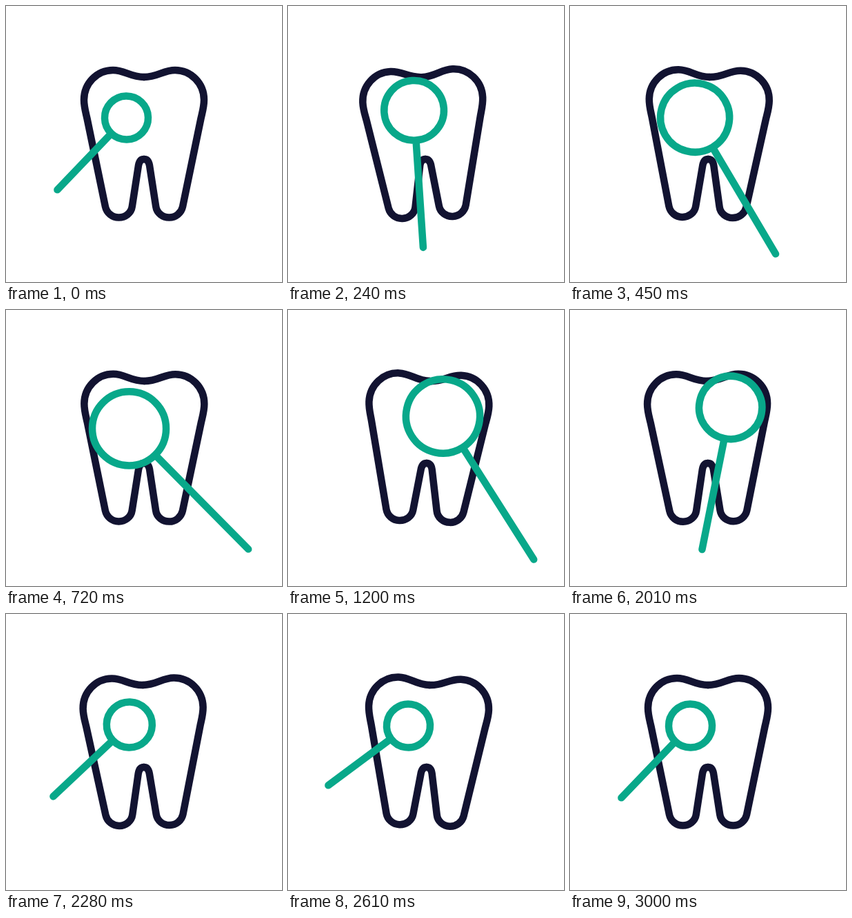
An HTML page with a canvas that plays this animation: 400 px wide and 400 px high, repeating every 5.03 s.

```html
<!DOCTYPE html>
<html lang="en">
<head>
<meta charset="utf-8">
<title>Dental check</title>
<style>
  html, body { margin: 0; width: 100%; height: 100%; overflow: hidden; background: #fff; }
  canvas { display: block; width: 100vmin; height: 100vmin; margin: 0 auto; }
</style>
</head>
<body>
<canvas id="stage"></canvas>
<script>
const canvas = document.getElementById('stage');
const ctx = canvas.getContext('2d');
const SIZE = 400, LOOP = 5030, MOVE_END = 3000;
const NAVY = '#121331', TEAL = '#08a88a';

// Right half of the tooth, measured from its vertical axis.
const halfTooth = new Path2D(
  'M0 103C20 103 28 93 45 93C68 93 87 112 87 136C87 146 84.5 154 82.5 163' +
  'L56 291C54 300 46 306.5 36.5 306.5C27 306.5 18.5 300 17.2 290.5' +
  'L8 231C7 225.5 4.5 222 0 222');

// Tooth rocking: [time, degrees]
const rocking = [
  [0, 0], [255, -2.4], [570, 2.4], [885, -2.4], [1200, 2.2], [1515, -2.4],
  [1830, 2.4], [2150, -2.4], [2470, 2.4], [MOVE_END, 0]
];

const mix = (a, b, p) => a + (b - a) * p;
const span = (t, from, to) => Math.min(1, Math.max(0, (t - from) / (to - from)));
const ease = (t, from, to) => (1 - Math.cos(Math.PI * span(t, from, to))) / 2;

function keyed(keys, t) {
  const i = keys.findIndex(k => t <= k[0]);
  if (i < 0) return keys[keys.length - 1][1];
  if (i === 0) return keys[0][1];
  const [from, a] = keys[i - 1], [to, b] = keys[i];
  return mix(a, b, ease(t, from, to));
}

function lensPose(t) {
  if (t < 800) {
    // Swing in and grow.
    const p = 1 - (1 - span(t, 0, 750)) ** 2;
    return {
      x: 174.5 + 4 * p + 24 * p * (1 - p),
      y: 162 + 64.5 * p * (p - 0.845),
      angle: mix(133.8, 45.2, p),
      scale: mix(1, 1.7, p)
    };
  }
  if (t < 1600) {
    // Glide across the crown.
    const p = ease(t, 800, 1600);
    return {
      x: mix(178.5, 270.5, p),
      y: mix(172, 128, p) + 4 * Math.sin(Math.PI * p),
      angle: mix(45.2, 70, p),
      scale: 1.7
    };
  }
  // Return, overshoot and settle.
  const p = ease(t, 1740, 2365);
  return {
    x: mix(270.5, 174.5, p),
    y: mix(128, 162, p),
    angle: mix(70, 147, ease(t, 1640, 2480)) - 13.2 * ease(t, 2480, 2850),
    scale: mix(1.7, 1, ease(t, 1750, 2388))
  };
}

function drawTooth(t) {
  ctx.save();
  ctx.strokeStyle = NAVY;
  ctx.translate(200, 250);
  ctx.rotate(keyed(rocking, t) * Math.PI / 180);
  ctx.translate(0, -250);
  ctx.stroke(halfTooth);
  ctx.scale(-1, 1);
  ctx.stroke(halfTooth);
  ctx.restore();
}

function drawLens(t) {
  const { x, y, angle, scale } = lensPose(t);
  const radius = 31.5 * scale;
  ctx.save();
  ctx.strokeStyle = TEAL;
  ctx.translate(x, y);
  ctx.rotate(angle * Math.PI / 180);
  ctx.beginPath();
  ctx.arc(0, 0, radius, 0, Math.PI * 2);
  ctx.moveTo(radius, 0);
  ctx.lineTo(144.6 * scale, 0);
  ctx.stroke();
  ctx.restore();
}

function resize() {
  const side = Math.min(innerWidth, innerHeight) * (window.devicePixelRatio || 1);
  canvas.width = canvas.height = Math.max(1, Math.round(side));
}

const start = performance.now();

function frame() {
  const elapsed = (performance.now() - start) % LOOP;
  const t = Math.min(MOVE_END, Math.floor(elapsed / 30) * 30);
  const k = canvas.width / SIZE;
  ctx.setTransform(k, 0, 0, k, 0, 0);
  ctx.fillStyle = '#fff';
  ctx.fillRect(0, 0, SIZE, SIZE);
  ctx.lineWidth = 10.5;
  ctx.lineCap = ctx.lineJoin = 'round';
  drawTooth(t);
  drawLens(t);
  requestAnimationFrame(frame);
}

addEventListener('resize', resize);
resize();
frame();
</script>
</body>
</html>
```
